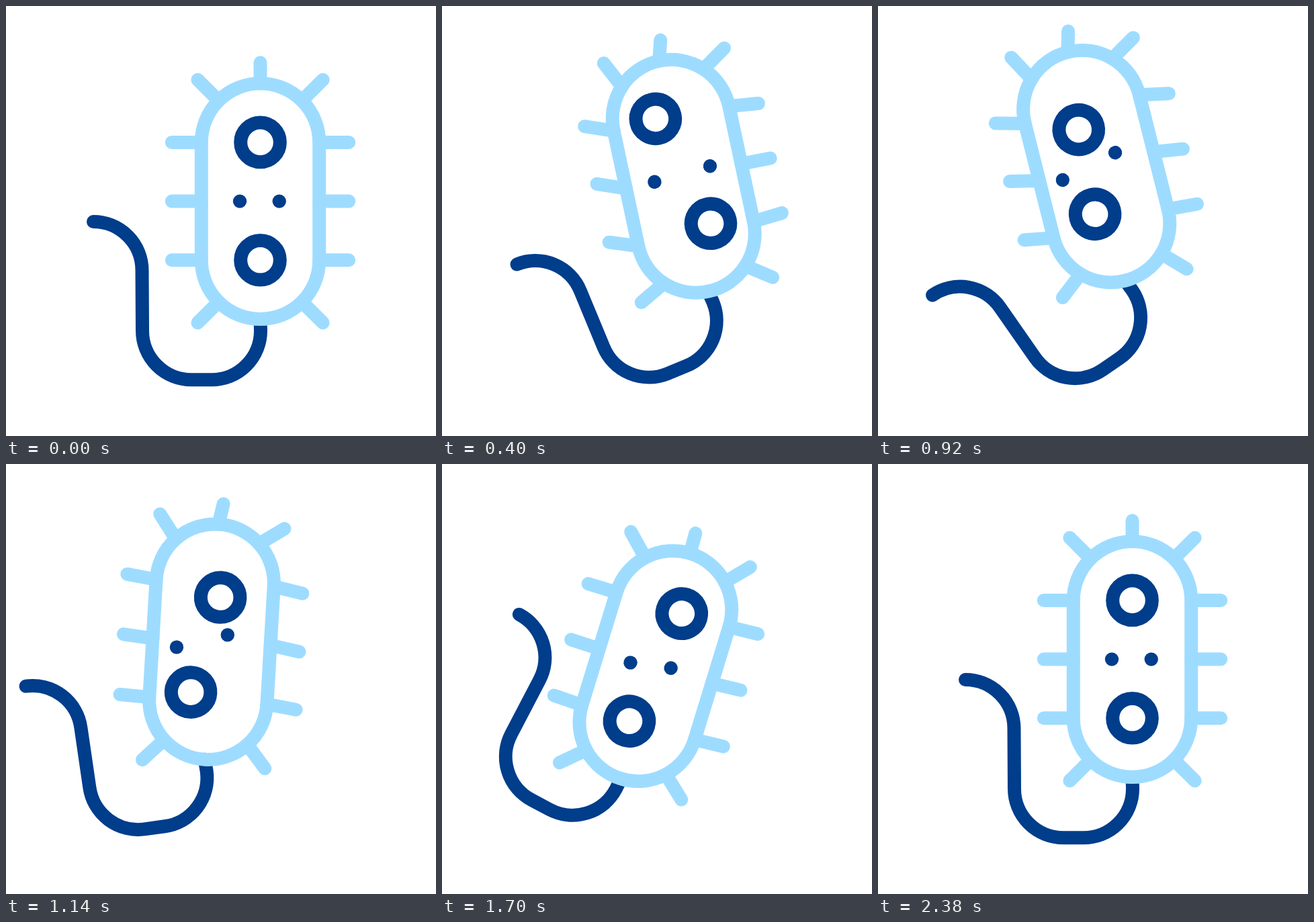
An HTML page with a canvas for the animation above (2400 ms loop, 640 px wide and 640 px high).

```html
<!DOCTYPE html>
<html lang="en">
<head>
<meta charset="utf-8">
<title>Swimming bacterium</title>
<style>
  html, body { margin: 0; height: 100%; overflow: hidden; background: #fff; }
  canvas { display: block; width: 640px; height: 640px; }
</style>
</head>
<body>
<canvas width="640" height="640"></canvas>
<script>
const ctx = document.querySelector('canvas').getContext('2d');
const LOOP = 2400, LIGHT = '#9edcff', DARK = '#003d8b';
const RADIUS = 87.7, HALF = 87.7;      // cap radius and half the straight side
const rad = deg => deg * Math.PI / 180;

// Keys are rows of [time, ...values]
const bodyX = [[0, 0], [400, -18.75], [920, -53.25], [1330, -82], [1700, -60.75], [2060, -14.75], [2320, 0]];
const bodyY = [[0, 0], [730, -65], [920, -52], [1380, 0], [1620, 10.5], [2320, 0]];
const bodyTurn = [[0, 0], [730, -21], [1475, 21.2], [2270, 0]];
const tailTurn = [[0, 0], [833, -21.5], [1660, 11], [2370, 0]];
const spikeWave = [[0, 0, 0], [400, 16.7, 12.8], [920, 6.5, 14.3], [1380, -6.3, 4.3], [1700, 2.7, -2.5], [2040, 0, 0]];
const rings = [
  [[0, 0, -87.7], [400, -23.1, -92.3], [920, -12.4, -59.4], [1380, 29.3, -78.6], [1700, 14.4, -86], [2040, 0, -87.7]],
  [[0, 0, 87.7], [400, 24.7, 77.3], [920, -19.3, 68.4], [1380, -29.9, 87.4], [1700, -13.2, 89.8], [2040, 0, 87.7]]
];
const dots = [
  [[0, -30.5, 0], [400, -44.1, -0.7], [920, -53.8, 7.4], [1380, -46.5, 13.2], [1700, -37.2, 6.1], [2040, -30.5, 0]],
  [[0, 28.2, 0], [400, 41.5, -6.5], [920, 32, -13], [1380, 16.2, -8.9], [1700, 22.7, -3.7], [2040, 28.2, 0]]
];

// Spikes clockwise from lower left: [base x, base y, direction, length]
const D = RADIUS * Math.SQRT1_2;
const spikes = [
  [-D, HALF + D, 135], [-RADIUS, HALF, 180], [-RADIUS, 0, 180], [-RADIUS, -HALF, 180], [-D, -HALF - D, 225],
  [0, -HALF - RADIUS, 270, 31],
  [D, -HALF - D, 315], [RADIUS, -HALF, 0], [RADIUS, 0, 0], [RADIUS, HALF, 0], [D, HALF + D, 45]
];

// Smooth curve through the keys, flat at every peak
function sample(keys, t) {
  const last = keys.length - 1;
  if (t >= keys[last][0]) return keys[last].slice(1);
  const i = keys.findIndex(key => key[0] > t) - 1;
  const span = keys[i + 1][0] - keys[i][0], u = (t - keys[i][0]) / span;
  return keys[i].slice(1).map((_, n) => {
    const c = n + 1;
    const rate = k => (keys[k + 1][c] - keys[k][c]) / (keys[k + 1][0] - keys[k][0]);
    const slope = k => {
      if (k === 0 || k === last) return 0;
      const a = rate(k - 1), b = rate(k);
      return a * b > 0 ? 2 * a * b / (a + b) : 0;
    };
    const from = keys[i][c], to = keys[i + 1][c];
    return from + (to - from) * u * u * (3 - 2 * u)
      + span * u * (1 - u) * (slope(i) * (1 - u) - slope(i + 1) * u);
  });
}

function stroke(color, trace) {
  ctx.strokeStyle = color;
  ctx.beginPath();
  trace();
  ctx.stroke();
}

function drawTail(turn) {
  ctx.save();
  ctx.translate(0, HALF + RADIUS);
  ctx.rotate(rad(turn));
  stroke(DARK, () => {
    ctx.moveTo(0, 0);
    ctx.arc(-72.5, 17.3, 73, 0, Math.PI / 2);
    ctx.arc(-102.5, 17.3, 73, Math.PI / 2, Math.PI);
    ctx.arc(-248.5, -72.5, 72.5, 0, -Math.PI / 2, true);
  });
  ctx.restore();
}

function draw(t) {
  ctx.fillStyle = '#fff';
  ctx.fillRect(0, 0, 640, 640);
  ctx.lineWidth = 20;
  ctx.lineCap = 'round';
  ctx.lineJoin = 'round';
  ctx.save();
  ctx.translate(378.5 + sample(bodyX, t)[0], 290.6 + sample(bodyY, t)[0]);
  ctx.rotate(rad(sample(bodyTurn, t)[0]));

  drawTail(sample(tailTurn, t)[0]);

  const [even, odd] = sample(spikeWave, t);
  spikes.forEach(([x, y, direction, length = 44], i) => {
    const phase = rad(15.6 * i);
    const angle = rad(direction + even * Math.cos(phase) + odd * Math.sin(phase));
    stroke(LIGHT, () => {
      ctx.moveTo(x, y);
      ctx.lineTo(x + length * Math.cos(angle), y + length * Math.sin(angle));
    });
  });

  stroke(LIGHT, () => {
    ctx.arc(0, -HALF, RADIUS, Math.PI, 0);
    ctx.arc(0, HALF, RADIUS, 0, Math.PI);
    ctx.closePath();
  });

  for (const ring of rings) stroke(DARK, () => ctx.arc(...sample(ring, t), 29.3, 0, 2 * Math.PI));
  ctx.fillStyle = DARK;
  for (const dot of dots) {
    ctx.beginPath();
    ctx.arc(...sample(dot, t), 10.2, 0, 2 * Math.PI);
    ctx.fill();
  }
  ctx.restore();
}

const start = performance.now();
function tick() {
  draw((performance.now() - start) % LOOP);
  requestAnimationFrame(tick);
}
tick();
</script>
</body>
</html>
```
